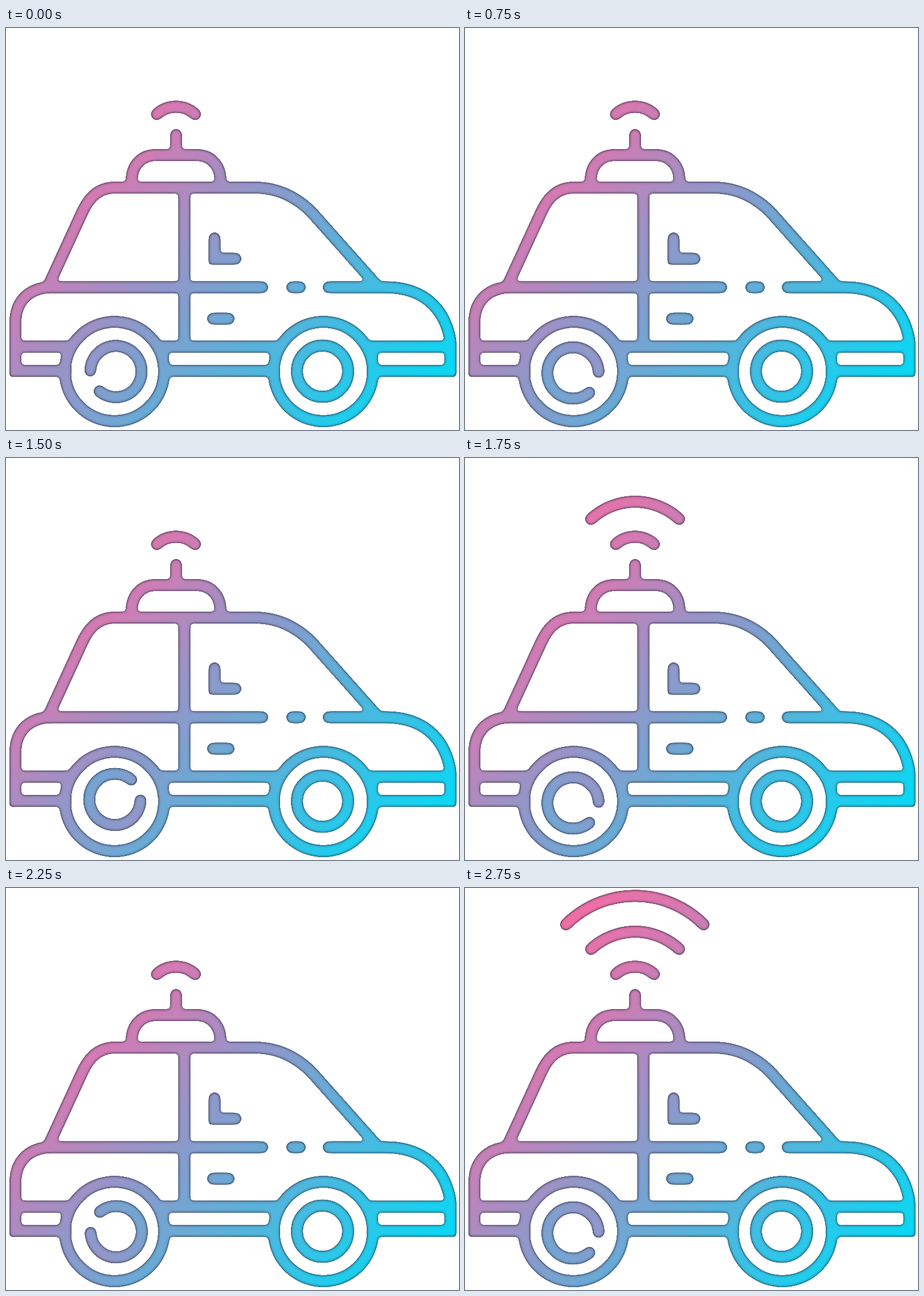
Animation of 795 by 704 pixels, one loop 3000 ms. Source, as an HTML page:

```html
<!DOCTYPE html>
<html lang="en">
<head>
<meta charset="utf-8">
<title>Car sending a signal</title>
<style>
  html, body { margin: 0; width: 100%; height: 100%; overflow: hidden; background: #fff; }
  svg { display: block; width: 100%; height: 100%; }
</style>
</head>
<body>
<svg viewBox="0 0 795 704">
  <defs>
    <linearGradient id="tint" gradientUnits="userSpaceOnUse" x1="120" y1="120" x2="682.5" y2="682.5">
      <stop offset="0" stop-color="#f06ea6"/>
      <stop offset=".2" stop-color="#d07cb4"/>
      <stop offset=".42" stop-color="#9496c8"/>
      <stop offset="1" stop-color="#0cd6f3"/>
    </linearGradient>
    <!-- Rounds the joints, then darkens the inside of every edge -->
    <filter id="tube" filterUnits="userSpaceOnUse" x="0" y="0" width="795" height="704"
            color-interpolation-filters="sRGB">
      <feGaussianBlur stdDeviation="3.3"/>
      <feComponentTransfer result="shape">
        <feFuncA type="linear" slope="24" intercept="-11.3"/>
      </feComponentTransfer>
      <feGaussianBlur stdDeviation="2.4"/>
      <feComponentTransfer result="soft">
        <feFuncA type="linear" slope="1.2" intercept="-.2"/>
      </feComponentTransfer>
      <feFlood flood-color="#28283c"/>
      <feComposite operator="out" in2="soft"/>
      <feComposite operator="atop" in2="shape"/>
    </filter>
  </defs>

  <g filter="url(#tube)" fill="none" stroke="url(#tint)" stroke-width="21" stroke-linecap="round">
    <!-- signal -->
    <path d="M264.5 151A49.6 49.6 0 0 1 332 151"/>
    <path id="middleWave" d="M221 107A113.7 113.7 0 0 1 376 107"/>
    <path id="outerWave" d="M177 64A171 171 0 0 1 419 64"/>

    <!-- antenna and roof light -->
    <path d="M298.5 187V222M220.5 276V266C221 240 238 222.5 262 222.5H335C359 222.5 376 240 376.5 266V276"/>

    <!-- cabin -->
    <path d="M76 448L134 322C145 298 161 279.5 190 279.5H440C475 280 508 295 535 321L650 450"/>
    <path d="M313 280V556"/>

    <!-- body -->
    <path d="M105 600.5H16.5V512C18 478 40 456 76 454H450M502 454H516M566 454H670C742 456 772 500 780 548V600.5H645"/>
    <path stroke-linecap="butt" d="M16.5 558H116M266 558H482M632 558H780M277 600.5H471"/>
    <path stroke-linecap="butt" stroke-width="14" d="M104 558V600M279 558V600M469 558V600M646 558V600"/>

    <!-- mirror and handle -->
    <path d="M366 368V404H403M363 509H391"/>

    <!-- wheels -->
    <circle cx="190.5" cy="601.5" r="87"/>
    <circle cx="557" cy="601.5" r="87"/>
    <circle cx="555.5" cy="601" r="45"/>
    <path id="hub" d="M148 600A45 45 0 1 1 164 636"/>
  </g>
</svg>
<script>
  const STEP = 250, LOOP = 3000;
  const hubFlips = [
    'matrix(1 0 0 1 0 0)',
    'matrix(1 0 0 -1 .5 1203.5)',
    'matrix(-1 0 0 -1 384 1199.5)',
    'matrix(-1 0 0 1 382.5 2.5)'
  ];
  const [hub, middleWave, outerWave] =
    ['hub', 'middleWave', 'outerWave'].map(id => document.getElementById(id));
  const show = (element, visible) =>
    element.setAttribute('visibility', visible ? 'visible' : 'hidden');

  const start = performance.now();
  let lastStep = -1;

  function draw(now) {
    const step = Math.floor(Math.max(0, now - start) % LOOP / STEP);
    if (step !== lastStep) {
      hub.setAttribute('transform', hubFlips[step % 4]);
      show(middleWave, step % 3 >= 1);
      show(outerWave, step % 3 === 2);
      lastStep = step;
    }
    requestAnimationFrame(draw);
  }
  draw(start);
</script>
</body>
</html>
```
